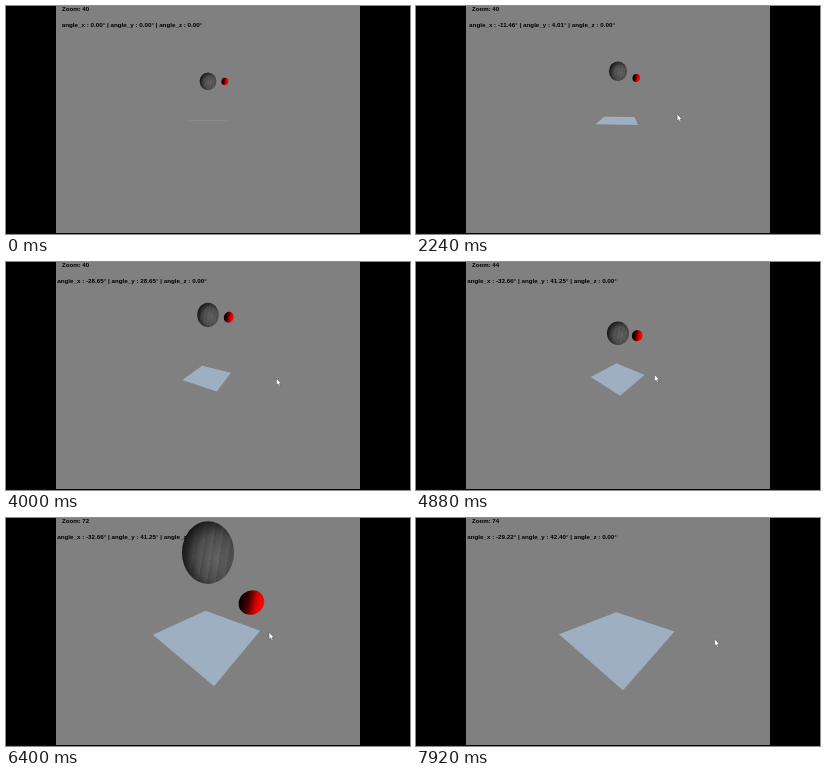
Write an HTML page that moves like this. It is 404 px wide and 228 px high and loops after 8 s.

```html
<!DOCTYPE html>
<html lang="en">
<head>
<meta charset="utf-8">
<title>Bouncing balls</title>
<style>
  html, body { margin: 0; width: 100%; height: 100%; overflow: hidden; background: #000; }
  svg { display: block; width: 100vw; height: 100vh; }
  text { font: bold 6.25px "Liberation Sans", Arial, sans-serif; fill: #000; white-space: pre; }
</style>
</head>
<body>
<svg viewBox="0 0 404 228">
  <defs>
    <clipPath id="view"><rect x="50" width="304" height="227"/></clipPath>
    <radialGradient id="grey" cx=".64" cy=".58" r=".66">
      <stop offset="0" stop-color="#686868"/>
      <stop offset=".55" stop-color="#525252"/>
      <stop offset="1" stop-color="#141414"/>
    </radialGradient>
    <linearGradient id="facets" x1="0" y1="0" x2=".16" y2=".03" spreadMethod="repeat">
      <stop offset="0" stop-color="#000" stop-opacity=".14"/>
      <stop offset="1" stop-color="#000" stop-opacity="0"/>
    </linearGradient>
    <linearGradient id="red" x1="0" y1=".4" x2="1" y2=".55">
      <stop offset=".1" stop-color="#0c0000"/>
      <stop offset=".4" stop-color="#500000"/>
      <stop offset=".65" stop-color="#c80000"/>
      <stop offset=".85" stop-color="#ff0000"/>
    </linearGradient>
  </defs>
  <rect width="404" height="228" fill="#000"/>
  <rect y="227" width="404" height="1" fill="#0e060c"/>
  <g clip-path="url(#view)">
    <rect x="50" width="304" height="227" fill="#808080"/>
    <text id="zoom" x="56" y="5.4" style="font-size:6.1px"></text>
    <text id="angles" x="126" y="20.8" text-anchor="middle"></text>
    <polygon id="plate" fill="#9dafc1"/>
    <g id="bigBall">
      <circle r="1" fill="url(#grey)"/>
      <circle r="1" fill="url(#facets)"/>
    </g>
    <circle id="smallBall" r="1" fill="url(#red)"/>
    <path id="cursor" d="M0 0V7L1.6 5.6L2.7 8.2L3.8 7.7L2.8 5.2H4.8Z" fill="#fff" stroke="#333" stroke-width=".4"/>
  </g>
</svg>
<script>
const LOOP = 8000, STEP = 80;
const CX = 202, CY = 113.5, FX = 107, FY = 113;
const GRAVITY = 8.9, DAMPING = .9, DROP = 20.2;
const DRAG_RATE = 1.45, DRAG_STEP = .01, CURSOR_SHOWN = 400;
const $ = id => document.getElementById(id);

const bigBall = { node: $('bigBall'), x: 0, r: 4.65, floor: 5, impact: 1.03, speed: 21 };
const smallBall = { node: $('smallBall'), x: 9.45, r: 1.95, floor: 2, impact: 1.11, speed: 21.7 };

// Mouse moves in order; dragging turns the scene
const home = { x: 295, y: 103 };
const move = (start, end, x, y) => ({ start, end, x, y });
const drag = (...args) => ({ ...move(...args), turns: true });
const moves = [
  move(1000, 1280, 290, 107),
  move(1280, 1760, 266, 110),
  move(1760, 1920, 266, 122),
  drag(1920, 2560, 256.3, 94),
  move(2640, 3120, 278, 93),
  move(3120, 3500, 295, 123),
  drag(3520, 4300, 255, 112),
  move(4300, 4480, 238.5, 112.5),
  move(6240, 6640, 300, 117),
  drag(6640, 6880, 298.6, 110),
  drag(6880, 7120, 298.6, 106),
  drag(7200, 7920, 298.6, 121),
];

const ramp = (t, start, end) => Math.min(1, Math.max(0, (t - start) / (end - start)));

function mouse(t) {
  let { x, y } = home, tilt = 0, turn = 0;
  for (const m of moves) {
    const f = ramp(t, m.start, m.end), dx = (m.x - x) * f, dy = (m.y - y) * f;
    x += dx;
    y += dy;
    if (m.turns) {
      turn -= dx * DRAG_RATE;
      tilt -= dy * DRAG_RATE;
    }
    if (f < 1) break;
  }
  return { x, y, tilt: Math.round(tilt) * DRAG_STEP, turn: Math.round(turn) * DRAG_STEP };
}

function height({ floor, impact, speed }, s) {
  if (s < impact) {
    const v = (floor - DROP) / impact + GRAVITY * impact / 2;
    return DROP + v * s - GRAVITY * s * s / 2;
  }
  let u = s - impact, v = speed;
  while (u > 2 * v / GRAVITY) {
    u -= 2 * v / GRAVITY;
    v *= DAMPING;
  }
  return floor + v * u - GRAVITY * u * u / 2;
}

// World point to camera space: right, up, depth
function toCamera([x, y, z], { tilt, turn, dist }) {
  const rx = x * Math.cos(turn) - z * Math.sin(turn);
  const rz = x * Math.sin(turn) + z * Math.cos(turn);
  return [rx, y * Math.cos(tilt) - rz * Math.sin(tilt),
    dist - rz * Math.cos(tilt) - y * Math.sin(tilt)];
}

function drawPlate(cam) {
  const corners = [[-10, -10], [10, -10], [10, 10], [-10, 10]].map(([x, z]) => {
    const [px, py, d] = toCamera([x, -.35, z], cam);
    return [CX + FX * px / d, CY - FY * py / d];
  });
  $('plate').setAttribute('points', corners.join(' '));
}

// A sphere in perspective is an ellipse stretched away from the view axis
function drawBall(ball, s, cam) {
  const [x, y, d] = toCamera([ball.x, height(ball, s), 0], cam);
  const rho = Math.hypot(x, y), phi = Math.atan2(rho, d);
  const sin = ball.r / Math.hypot(rho, d);
  const k = Math.cos(phi) ** 2 - sin * sin;
  const visible = d > 0 && k > .01;
  ball.node.style.display = visible ? '' : 'none';
  if (!visible) return;
  const long = sin * Math.sqrt(1 - sin * sin) / k, short = sin / Math.sqrt(k);
  const mid = Math.sin(phi) * Math.cos(phi) / k;
  const dir = Math.atan2(-y, x), deg = dir * 180 / Math.PI;
  const px = CX + FX * mid * Math.cos(dir), py = CY + FY * mid * Math.sin(dir);
  ball.node.setAttribute('transform', `translate(${px} ${py}) rotate(${deg}) ` +
    `scale(${FX * long} ${FX * short}) rotate(${-deg})`);
}

function draw(t) {
  const { x, y, tilt, turn } = mouse(t);
  const zoom = 40 + 2 * Math.round(17 * ramp(t, 4650, 6500));
  const cam = { tilt, turn, dist: 100 - zoom };
  const label = (axis, rad) => `angle_${axis} : ${(rad * 180 / Math.PI).toFixed(2)}°`;

  $('zoom').textContent = `Zoom: ${zoom}`;
  $('angles').textContent = [label('x', -tilt), label('y', turn), label('z', 0)].join(' | ');
  drawPlate(cam);
  drawBall(bigBall, t / 1000, cam);
  drawBall(smallBall, t / 1000, cam);
  $('cursor').style.display = t < CURSOR_SHOWN ? 'none' : '';
  $('cursor').setAttribute('transform', `translate(${x} ${y})`);
}

const begin = performance.now();
function tick() {
  const t = (performance.now() - begin) % LOOP;
  draw(Math.floor(t / STEP) * STEP);
  requestAnimationFrame(tick);
}
tick();
</script>
</body>
</html>
```
